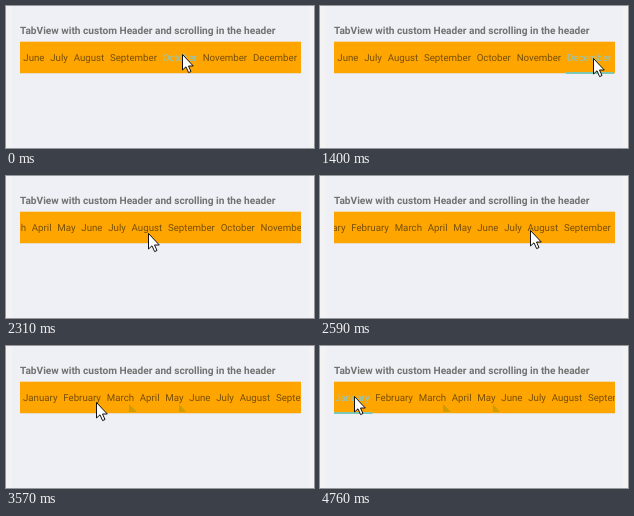
Animation of 308 by 142 pixels, one loop 4900 ms. Source, as an HTML page:

```html
<!DOCTYPE html>
<html lang="en">
<head>
<meta charset="utf-8">
<title>TabView header</title>
<style>
  html, body { margin: 0; width: 100%; height: 100%; overflow: hidden; background: #f3f3f4; }
  svg { display: block; width: 100vw; height: 100vh; font-family: Roboto, sans-serif; text-rendering: geometricPrecision; }
  .title { font-size: 10.15px; font-weight: 700; fill: #727272; }
  .month { font-size: 9.7px; fill: #775006; }
  .month.selected { fill: #93c8bc; }
  .underline { fill: #7cc8b4; }
</style>
</head>
<body>
<svg viewBox="0 0 308 142">
  <defs><clipPath id="header"><rect x="14" y="35" width="281" height="33"/></clipPath></defs>
  <rect x="6" width="297" height="142" fill="#eff0f5"/>
  <text class="title" x="14" y="28">TabView with custom Header and scrolling in the header</text>
  <g clip-path="url(#header)">
    <rect x="14" y="67" width="281" height="1" fill="#e6dcc8"/>
    <rect x="14" y="35.7" width="281" height="31.3" fill="#ffa500"/>
    <path id="trail" d="M123 58v8h8zM173 58v8h7z" fill="#b99a08" opacity=".7"/>
    <g id="tabs"><rect id="underline" class="underline" y="66" height="2"/></g>
  </g>
  <path id="cursor" d="M.5 .5V16L4 12.8 6.6 18.6 9 17.5 6.5 12H11.3Z" fill="#fff" stroke="#111" stroke-linejoin="round"/>
</svg>
<script>
const LOOP = 4900, STEP = 70, GAP = 5.75;
const names = ['January', 'February', 'March', 'April', 'May', 'June', 'July',
  'August', 'September', 'October', 'November', 'December'];

const home = { x: 176, y: 48 };
const moves = [
  { from: 0, to: 490, x: 230, y: 51 },
  { from: 700, to: 980, x: 285, y: 57 },
  { from: 980, to: 1190, x: 273, y: 52 },
  { from: 1400, to: 1960, x: 55, y: 54 },
  { from: 2100, to: 2800, x: 225, y: 52.5 },
  { from: 2800, to: 3360, x: 36, y: 56 },
  { from: 3360, to: 3710, x: 100, y: 55 },
  { from: 3710, to: 4060, x: 34, y: 50 }
];

const byId = id => document.getElementById(id);
const show = (id, on) => byId(id).setAttribute('visibility', on ? 'visible' : 'hidden');
const moveTo = (node, x, y) => node.setAttribute('transform', `translate(${x} ${y})`);
const progress = (t, from, to) => Math.min(1, Math.max(0, (t - from) / (to - from)));
const easeOut = k => 1 - (1 - k) ** 2;

// Longer strokes of the hand sag further below the straight line.
function pointerAt(t) {
  return moves.reduce((p, move) => {
    const k = easeOut(progress(t, move.from, move.to));
    const sag = Math.abs(move.x - p.x) / 40 * Math.sin(Math.PI * k);
    return { x: p.x + (move.x - p.x) * k, y: p.y + (move.y - p.y) * k + sag };
  }, home);
}

function scrollAt(t) {
  return t < 4340 ? -149 + 166 * progress(t, 2112, 2679) : 15;
}

function selectedAt(t) {
  if (t >= 4340) return 'January';
  if (t >= 1400) return 'December';
  return t >= 700 ? 'November' : 'October';
}

let right = 0;
const tabs = names.map(name => {
  const label = document.createElementNS('http://www.w3.org/2000/svg', 'text');
  label.textContent = name;
  label.setAttribute('class', 'month');
  label.setAttribute('x', right);
  label.setAttribute('y', 55);
  byId('tabs').append(label);
  const tab = { name, label, x: right, width: label.getComputedTextLength() };
  right += tab.width + GAP;
  return tab;
});

function draw(t) {
  const current = selectedAt(t);
  for (const { name, label, x, width } of tabs) {
    label.classList.toggle('selected', name === current);
    if (name === current) {
      byId('underline').setAttribute('x', x - 1);
      byId('underline').setAttribute('width', width + 4);
    }
  }
  show('underline', t >= 700);
  show('trail', t >= 3080);
  moveTo(byId('tabs'), scrollAt(t), 0);
  const { x, y } = pointerAt(t);
  moveTo(byId('cursor'), Math.round(x), Math.round(y));
}

const start = performance.now();
function tick() {
  const t = (performance.now() - start) % LOOP;
  draw(Math.floor(t / STEP) * STEP);
  requestAnimationFrame(tick);
}
tick();
</script>
</body>
</html>
```
